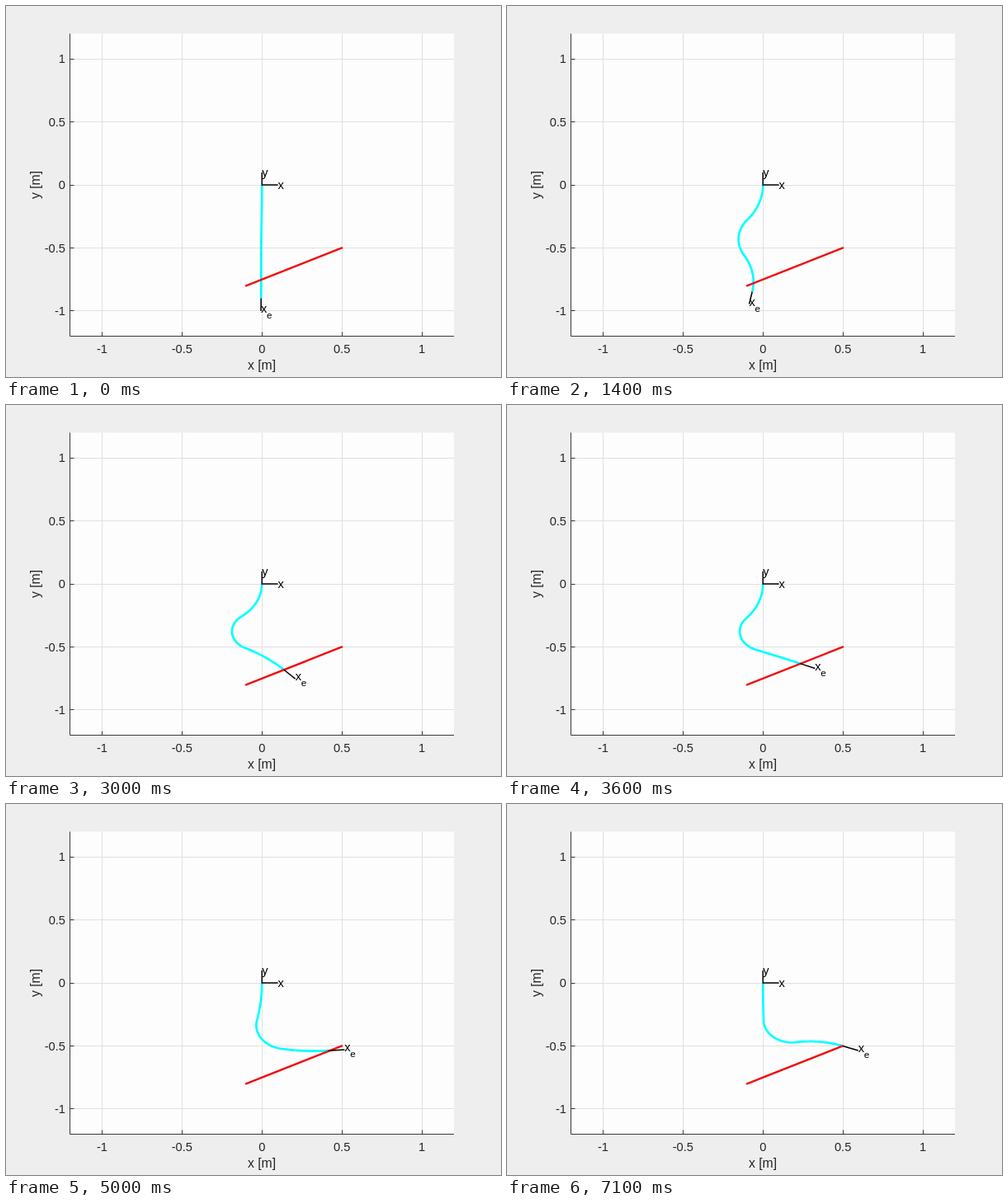
Recreate the animation shown at these times as an HTML page. Size 600 by 450 pixels, loop 7.2 s.

```html
<!DOCTYPE html>
<html lang="en">
<head>
<meta charset="utf-8">
<title>Three-segment arm</title>
<style>
  html, body { margin: 0; width: 100%; height: 100%; overflow: hidden; background: #eeeeef; }
  svg { display: block; }
  text { font: 14.67px "Liberation Sans", Arial, sans-serif; fill: #262626; }
  .title { font-size: 15.8px; text-anchor: middle; }
  .mark text { fill: #000; }
  .mark .sub { font-size: 11.7px; }
  .grid { stroke: #e0e0e1; }
  .axis { stroke: #3a3a3a; fill: none; }
  .arm { stroke: #0ff; stroke-width: 2.7; fill: none; stroke-linejoin: round; }
  .goal { stroke: #f00e0e; stroke-width: 2.5; stroke-linecap: round; }
  .pointer { stroke: #000; stroke-width: 1.5; fill: none; }
</style>
</head>
<body>
<svg width="600" height="450" viewBox="0 0 600 450">
  <rect x="78" y="33.5" width="465" height="367" fill="#fdfdfe"/>
  <g id="grid" class="grid"></g>
  <g id="axes" class="axis"><path d="M77.5 33.5V400.5H543"/></g>
  <g id="labels"></g>
  <text class="title" x="310" y="441">x [m]</text>
  <text class="title" transform="translate(40.5 217) rotate(-90)">y [m]</text>
  <path id="arm" class="arm"/>
  <path id="goal" class="goal"/>
  <path id="base" class="pointer"/>
  <path id="tip" class="pointer"/>
  <g class="mark">
    <text x="329.6" y="222.3">x</text>
    <text x="310.2" y="207">y</text>
    <g id="tipLabel"><text y="2.3">x</text><text class="sub" x="7" y="9.3">e</text></g>
  </g>
</svg>
<script>
const LOOP = 7200, STEP = 100, LENGTH = 0.3, AXIS = 0.1;
const RAD = Math.PI / 180;

// time in ms, then the bend of each segment in degrees
const POSES = [
  [0, -1, 1, -0.2],
  [800, -27, 43, -26],
  [1400, -39, 70, -42],
  [1600, -44.5, 81, -42.5],
  [2400, -57, 110.5, -31],
  [3000, -53, 117, -19],
  [3200, -50, 116, -14],
  [4000, -34, 106, 11],
  [4200, -30, 102, 17],
  [4800, -16, 94, 17],
  [5000, -12, 91.5, 15],
  [5600, -3.5, 89, 2],
  [5800, -1.5, 89.5, -2.5],
  [6400, 1, 93, -19],
  [7100, 1.5, 97, -29]
];

const $ = id => document.getElementById(id);
const px = x => 310.25 + 193.75 * x;
const py = y => 217 - 152.9 * y;
const at = (x, y) => px(x).toFixed(2) + " " + py(y).toFixed(2);

function add(parent, name, attrs, text = "") {
  const el = document.createElementNS("http://www.w3.org/2000/svg", name);
  for (const key in attrs) el.setAttribute(key, attrs[key]);
  el.textContent = text;
  $(parent).append(el);
}

function drawScale() {
  for (let v = -1; v <= 1; v += 0.5) {
    const x = Math.floor(px(v)) + 0.5, y = Math.floor(py(v)) + 0.5;
    add("grid", "path", { d: `M${x} 33.5V400M78 ${y}H543` });
    add("axes", "path", { d: `M${x} 400.5v-5M77.5 ${y}h5` });
    add("labels", "text", { x: px(v), y: 420.7, "text-anchor": "middle" }, v);
    add("labels", "text", { x: 72, y: py(v) + 5.3, "text-anchor": "end" }, v);
  }
  $("goal").setAttribute("d", `M${at(-0.1, -0.8)}L${at(0.5, -0.5)}`);
  $("base").setAttribute("d", `M${at(0, AXIS)}L${at(0, 0)}L${at(AXIS, 0)}`);
}

function slope(i, k) {
  const a = POSES[Math.max(i - 1, 0)], b = POSES[Math.min(i + 1, POSES.length - 1)];
  return (b[k] - a[k]) / (b[0] - a[0]);
}

// cubic Hermite interpolation of the bends
function bendsAt(t) {
  let i = 0;
  while (i < POSES.length - 2 && t >= POSES[i + 1][0]) i++;
  const a = POSES[i], b = POSES[i + 1], span = b[0] - a[0];
  const u = (t - a[0]) / span, w = 1 - u;
  return [1, 2, 3].map(k =>
    w * w * (1 + 2 * u) * a[k] + u * u * (3 - 2 * u) * b[k] +
    span * u * w * (w * slope(i, k) - u * slope(i + 1, k)));
}

function draw(t) {
  let x = 0, y = 0, heading = -90 * RAD, d = "M" + at(0, 0);
  const parts = 20;
  for (const bend of bendsAt(t)) {
    const turn = bend * RAD / parts;
    const half = turn / 2;
    const chord = LENGTH / parts * (half ? Math.sin(half) / half : 1);
    for (let n = 0; n < parts; n++) {
      x += chord * Math.cos(heading + half);
      y += chord * Math.sin(heading + half);
      heading += turn;
      d += "L" + at(x, y);
    }
  }
  const ex = x + AXIS * Math.cos(heading), ey = y + AXIS * Math.sin(heading);
  $("arm").setAttribute("d", d);
  $("tip").setAttribute("d", `M${at(x, y)}L${at(ex, ey)}`);
  $("tipLabel").setAttribute("transform", `translate(${at(ex, ey)})`);
}

const start = performance.now();
function tick() {
  const t = (performance.now() - start) % LOOP;
  draw(Math.floor(t / STEP) * STEP);
  requestAnimationFrame(tick);
}

drawScale();
tick();
</script>
</body>
</html>
```
